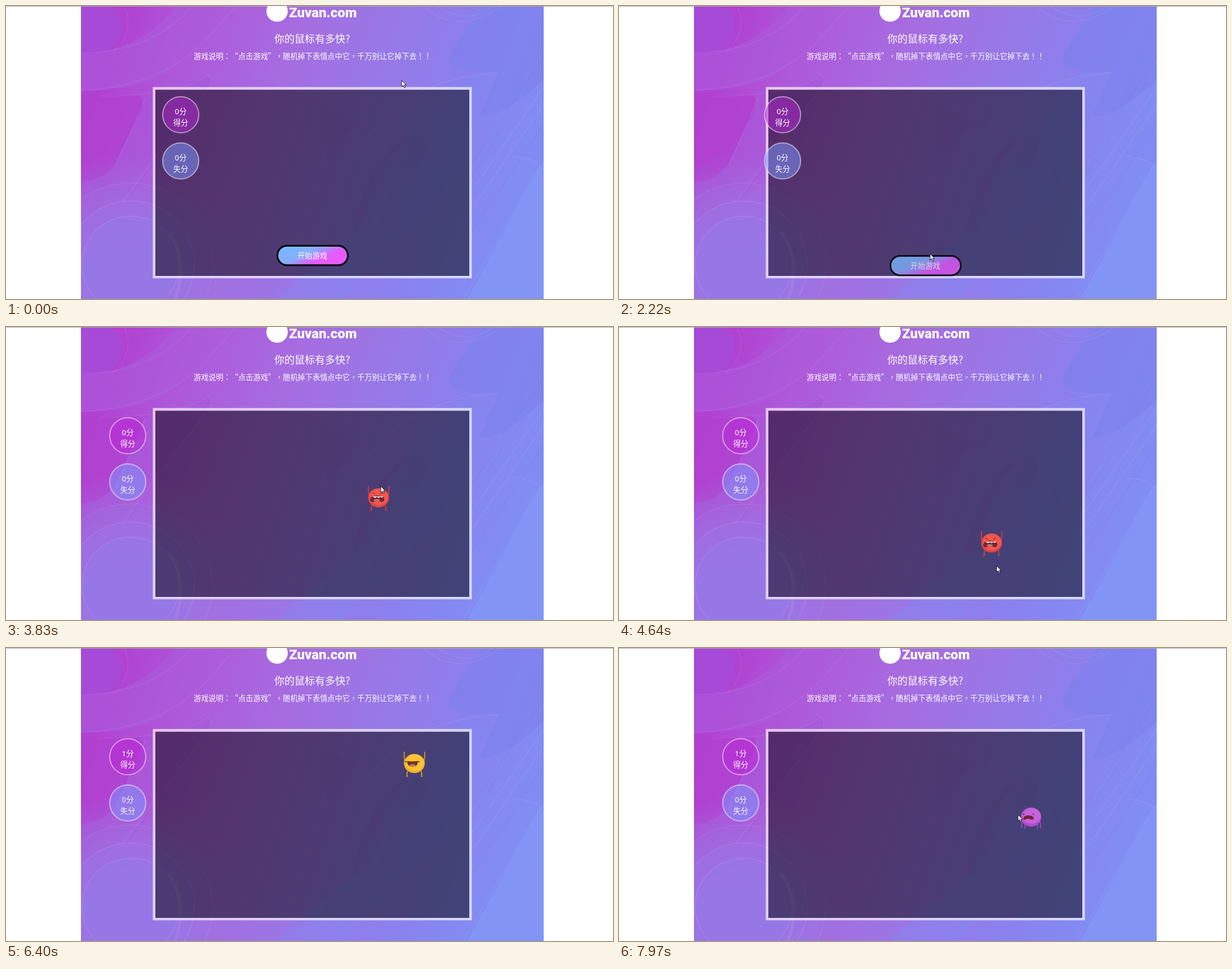
These frames come from a looping animation (1077x520 px, 8000 ms). An HTML page:

```html
<!DOCTYPE html>
<html lang="zh-CN">
<head>
<meta charset="utf-8">
<style>
  html, body { margin: 0; width: 100%; height: 100%; overflow: hidden; background: #fff; }
  svg { display: block; width: 1077px; height: 520px; }
  text { fill: #fff; font: 13.3px "Noto Sans", "Noto Sans CJK SC", "Noto Sans CJK", sans-serif; }
  .zh { font-family: "Noto Sans CJK SC", "Noto Sans CJK", sans-serif; }
  .rules { font: 13.2px "Noto Sans CJK TC", "Noto Sans CJK", sans-serif; text-spacing-trim: space-all; }
  .mid { text-anchor: middle; }
</style>
</head>
<body>
<svg viewBox="0 0 1077 520">
  <defs>
    <linearGradient id="sky" gradientUnits="userSpaceOnUse" x1="150" y1="180" x2="900" y2="440">
      <stop offset="0" stop-color="#b142d2"/>
      <stop offset=".15" stop-color="#ae58d9"/>
      <stop offset=".38" stop-color="#a66ce0"/>
      <stop offset=".55" stop-color="#9a77e6"/>
      <stop offset=".75" stop-color="#8b80ed"/>
      <stop offset="1" stop-color="#808ff4"/>
    </linearGradient>
    <linearGradient id="pill" x1="0" y1=".2" x2="1" y2=".8">
      <stop offset=".1" stop-color="#7ab6ff"/>
      <stop offset=".38" stop-color="#86aeff"/>
      <stop offset=".66" stop-color="#e25cff"/>
      <stop offset="1" stop-color="#e95bff"/>
    </linearGradient>
    <radialGradient id="glow" gradientUnits="userSpaceOnUse" cx="215" cy="500" r="240">
      <stop offset=".3" stop-color="#9c74e2"/>
      <stop offset="1" stop-color="#9c74e2" stop-opacity="0"/>
    </radialGradient>
    <clipPath id="page"><path d="M133 0H954V520H133Z"/></clipPath>

    <path id="limbs" fill="none" stroke-width="2" stroke-linecap="round"
      d="M-17-4Q-18.500-12-18-20M17-4Q19-12 18.500-20M-12 14Q-14 18-12.500 22.500L-14 22.500M12 14Q14 18 12.500 22.500L14 22.500"/>
    <g id="red">
      <use href="#limbs" stroke="#c23f42"/>
      <ellipse rx="18.500" ry="17" fill="#de4644"/>
      <ellipse cx="1" cy="-1.500" rx="16.500" ry="14.500" fill="#f2554f"/>
      <path d="M-11-9L-6-6.500M3-6.500L8-9" stroke="#8a2c33" stroke-width="1.200"/>
      <path d="M-15 3Q-13-4-3-4Q8-4 10 1Q11 7 6 7.500Q-3 5-9 7.500Q-15 8-15 3Z" fill="#74282f"/>
      <path d="M-11-2.500L8-2.500 6 0 3-1.500 0 .5-3-1.500-6 .5-9-1Z" fill="#f6e5e0"/>
      <ellipse cx="-3" cy="4.500" rx="5.500" ry="2.500" fill="#c46a70"/>
    </g>
    <g id="yellow">
      <use href="#limbs" stroke="#c98f2f"/>
      <ellipse rx="18.500" ry="17" fill="#f0b02d"/>
      <ellipse cx="1" cy="-1.500" rx="16.500" ry="14.500" fill="#fcc433"/>
      <circle cx="-15" cy="-3" r="1.300" fill="#5c3b20"/>
      <circle cx="8" cy="-3" r="1.300" fill="#5c3b20"/>
      <path d="M-13-4.500Q-3-3 6-4.500Q7 5.500-3 5.500Q-13 5.500-13-4.500Z" fill="#74352e"/>
      <ellipse cx="-3" cy="3.300" rx="5" ry="2" fill="#d4706a"/>
    </g>
    <g id="purple">
      <path d="M-16 8L-17 19M-11 13V20M11 13L12 20M16 8L17 19" stroke="#9a46b6" stroke-width="2" stroke-linecap="round"/>
      <ellipse rx="18" ry="17" fill="#b34fcb"/>
      <ellipse cx="1" cy="-2" rx="16" ry="14" fill="#c562da"/>
      <path d="M-14 3Q-13-3-5-3Q4-3 5 3Q3 6-1 4Q-5 2-9 4Q-13 6-14 3Z" fill="#702438"/>
      <circle cx="-13" cy="-5" r="1.200" fill="#5b2468"/>
      <circle cx="4" cy="-5" r="1.200" fill="#5b2468"/>
    </g>
  </defs>

  <g clip-path="url(#page)">
    <path d="M133 0H954V520H133Z" fill="url(#sky)"/>
    <path d="M133 0H185Q212 18 204 48Q196 78 170 83L133 82Z" fill="#a54cd9" opacity=".75"/>
    <path d="M133 84Q240 82 300 0H335Q365 12 350 45L295 110Q250 150 133 150Z" fill="#ab5ddc" opacity=".6"/>
    <path d="M352 122Q374 130 358 148L210 330L133 400V318L240 165Q300 155 352 122Z" fill="#a758da" opacity=".5"/>
    <path d="M133 158L236 158Q248 168 238 190L192 282Q170 312 133 312Z" fill="#b240d1" opacity=".8"/>
    <path d="M133 520V260H460V520Z" fill="url(#glow)"/>
    <path d="M560 180L625 205L570 275Z" fill="#a15fd5" opacity=".25"/>
    <path d="M615 400Q640 290 690 245Q740 215 745 250Q740 290 690 285L640 400Z" fill="#a15fd5" opacity=".22"/>
    <path d="M848 0Q812 45 790 82Q776 118 850 118Q860 118 874 118L840 195Q880 200 954 130V0Z" fill="#7f82ef" opacity=".65"/>
    <path d="M680 270L810 130Q870 112 874 122L770 340L600 520H818L948 284Q942 272 900 266L954 190V520H480L620 400Z" fill="#8086f1" opacity=".35"/>
    <path d="M818 520L948 284L954 276V520Z" fill="#8298f7" opacity=".8"/>

    <g fill="none" stroke="#fff" stroke-opacity=".11">
      <path d="M133 83Q260 83 330 0M133 150Q270 145 350 65Q410 0 410-5M165 160Q310 160 360 122Q370 135 355 150L205 350"/>
      <path d="M210 0Q225 30 205 65L190 82M248 163L195 282M630 250Q700 130 874 118M740 0Q800 55 880 0M765 0Q820 36 865 0"/>
      <path d="M900 267Q943 272 948 284L812 520M954 145L825 330M954 175L830 355"/>
    </g>
    <g fill="none" stroke="#4d35b8" stroke-opacity=".1">
      <path d="M215 0Q222 36 196 78M244 160L190 290M954 90L820 290M954 210L826 400M890 200L825 305M365 125L212 350"/>
    </g>
    <g fill="#9579e6" stroke="#e4b0f0" stroke-opacity=".3">
      <circle cx="221" cy="459" r="145" fill-opacity=".12" stroke-opacity=".2"/>
      <circle cx="221" cy="459" r="113" fill-opacity=".25"/>
      <circle cx="221" cy="459" r="86" fill-opacity=".45"/>
    </g>
    <path d="M288 400Q325 450 300 520" fill="none" stroke="#c095e8" stroke-opacity=".22" stroke-width="6"/>
  </g>
  <path d="M0 .5H1077" stroke="#aaa"/>

  <circle cx="481" cy="9" r="19" fill="#fff"/>
  <text x="502" y="20" style="font:900 24px Roboto,sans-serif">Zuvan.com</text>
  <text class="zh" x="476" y="65" style="font-size:18px">你的鼠标有多快?</text>
  <text class="rules" lang="zh-TW" x="333" y="93.500">游戏说明：“点击游戏”，随机掉下表情点中它，千万别让它掉下去！！</text>

  <path d="M265 148.500H822V479H265Z" fill="#000" fill-opacity=".5"/>
  <path d="M260.500 143.800H826.500V483.300H260.500ZM265 148.500V479H822V148.500Z" fill="#fff" fill-opacity=".67" fill-rule="evenodd"/>

  <g id="scores" class="mid" stroke-width="2">
    <circle cy="193" r="32" fill="#b928d7" fill-opacity=".5" stroke="#fff" stroke-opacity=".5"/>
    <text id="hits" y="192">0分</text>
    <text y="212">得分</text>
    <circle cy="275" r="32" fill="#7e9aff" fill-opacity=".5" stroke="#fff" stroke-opacity=".5"/>
    <text y="274">0分</text>
    <text y="294">失分</text>
  </g>

  <g id="start">
    <rect x="481.500" y="425.500" width="125" height="34.500" rx="17.200" fill="url(#pill)" stroke="#000" stroke-width="3"/>
    <text class="zh mid" x="543.500" y="448">开始游戏</text>
  </g>

  <use id="face"/>
  <circle id="speck" cx="221" cy="190" r="1.300" fill="#8a9a3c"/>
  <path id="cursor" d="M0 0V11L2.600 8.600 4.600 13 6.400 12.200 4.500 8H8Z" fill="#fff" stroke="#111" stroke-width=".9"/>
</svg>
<script>
const $ = id => document.getElementById(id);
const LOOP = 8000, STEP = 133.9, SPEED = 0.1;

// time, x, y of the pointer tip
const pointer = [
  [80, 702, 132], [1080, 562, 402], [1200, 562, 402], [1340, 548, 443], [1480, 552, 440],
  [2650, 552, 440], [3150, 708, 122], [3820, 665, 281], [4250, 664, 388], [4500, 672, 448],
  [4630, 670, 424], [4740, 670, 405], [5000, 672, 421], [6800, 893, 255], [7320, 722, 300],
  [7580, 647, 300], [7970, 708, 296]
];

// a face falls, shakes once hit, then flies to the score
const faces = [
  { kind: 'red', x: 661, y: 174, born: 2537, hit: 4740, fly: 5050, end: 5370 },
  { kind: 'yellow', x: 724.5, y: 174, born: 6061, hit: 7320, fly: 9000, end: 9400 }
];

const clamp = v => Math.max(0, Math.min(1, v));
const mix = (a, b, k) => a + (b - a) * k;
const bezier = (a, b, c, k) => mix(mix(a, b, k), mix(b, c, k), k);
const show = (el, on) => el.setAttribute('visibility', on ? 'visible' : 'hidden');
const place = (el, x, y, s = 1) => el.setAttribute('transform', `translate(${x} ${y}) scale(${s})`);

function pointerAt(t) {
  const i = pointer.findIndex(k => k[0] > t);
  if (i === 0) return pointer[0].slice(1);
  if (i < 0) return pointer[pointer.length - 1].slice(1);
  const a = pointer[i - 1], b = pointer[i], k = (t - a[0]) / (b[0] - a[0]);
  return [mix(a[1], b[1], k), mix(a[2], b[2], k)];
}

function drawFace(t) {
  const f = faces.find(f => t >= f.born && t < f.end);
  show($('face'), f);
  if (!f) return;
  let x = f.x, y = f.y + (Math.min(t, f.hit) - f.born) * SPEED, size = 1;
  if (t >= f.fly) {
    const k = (t - f.fly) / (f.end - f.fly);
    x = bezier(x, 280, 220, k);
    y = bezier(y, 470, 190, k);
    size = 1 - k;
  } else if (t >= f.hit) {
    x += 12 * Math.sin((t - f.hit) * 0.02);
  }
  $('face').setAttribute('href', '#' + (t < f.hit ? f.kind : 'purple'));
  place($('face'), x, y, size);
}

function draw(now) {
  // the screen refreshes in coarse steps
  const n = Math.floor((now % LOOP - 2200) / STEP);
  const t = Math.max(0, 2220 + STEP * n);
  const p = clamp((t - 2132) / 418);

  place($('scores'), mix(310, 216, p), 0);
  place($('start'), 0, 85 * p);
  $('start').setAttribute('opacity', p < 0.6 ? 1 - p : 0);
  $('hits').textContent = (t < 5430 ? 0 : 1) + '分';
  show($('speck'), t > 5400 && t < 6500);
  drawFace(t);
  place($('cursor'), ...pointerAt(t));
  show($('cursor'), t < 5490 || t >= 6800);
  requestAnimationFrame(draw);
}
draw(performance.now());
</script>
</body>
</html>
```
